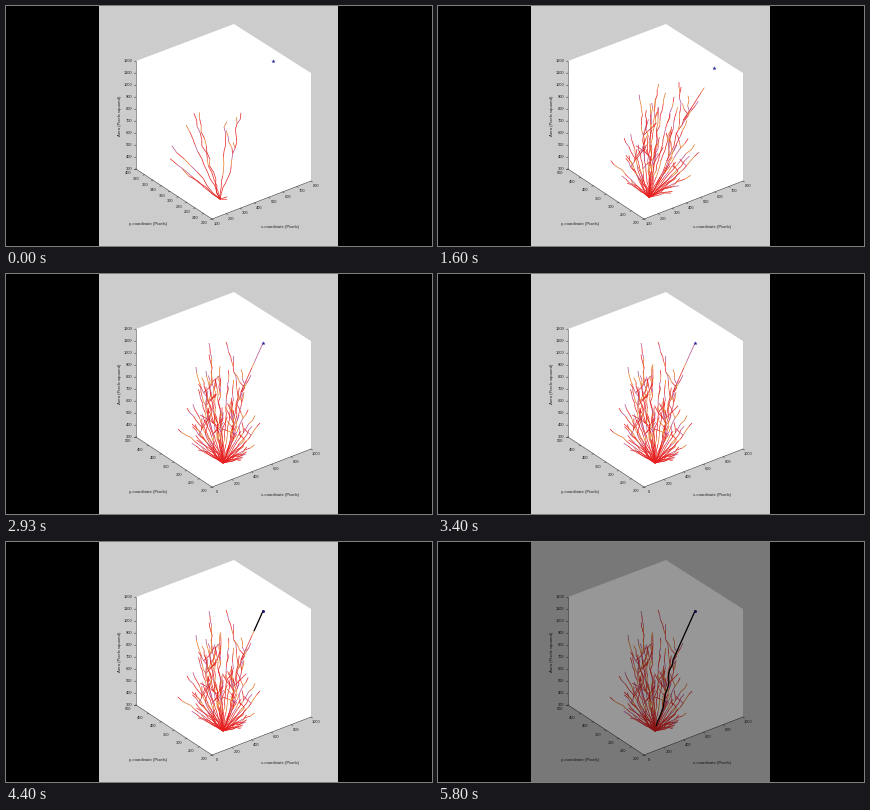
Animation, 426 px wide and 240 px high, one loop 5870 ms. Source, as a matplotlib script:

```python
import numpy as np
import matplotlib.pyplot as plt
from matplotlib.animation import FuncAnimation
from matplotlib.collections import LineCollection
from matplotlib.patches import Polygon, Rectangle

W, H, FRAMES, LOOP = 426, 240, 88, 5870
PX = 0.72  # points per pixel at 100 dpi
rng = np.random.default_rng(5)

# Projected cube: origin corner and its three edges on the stage
ORIGIN = np.array([206.0, 213.0])
EDGES = EX, EY, EZ = np.array([[99.0, -38.0], [-76.0, -50.0], [0.0, -108.0]])
Z_LIM = (300, 1200, 100)

# (first step, x limits, y limits): the axes rescale as the tree spreads
STAGES = [
    (0, (100, 800, 100), (220, 400, 20)),
    (6, (100, 800, 100), (200, 450, 50)),
    (17, (100, 800, 100), (200, 500, 50)),
    (36, (0, 1000, 200), (200, 500, 50)),
]

# Key spots, as they appear under the last axes
ROOT, ELBOW, FORK, GOAL = (217, 189), (232, 127), (235, 118), (257, 69)
STEM_TIPS = [(203, 69), (190, 93), (172, 155), (214, 92), (254, 149),
             (181, 134), (200, 97), (186, 150), (240, 180)]


def stage_at(i):
    return max(k for k, s in enumerate(STAGES) if i >= s[0])


def unit(v, lim):
    return (np.asarray(v, float) - lim[0]) / (lim[1] - lim[0])


def project(p, stage):
    lims = (*STAGES[stage][1:], Z_LIM)
    uvw = np.column_stack([unit(p[:, k], lim) for k, lim in enumerate(lims)])
    return ORIGIN + uvw @ EDGES


def lift(sx, sy):
    """Point in space seen at (sx, sy); depth grows with height above the root."""
    x = 195 + 4.7 * (ROOT[1] - sy) + 3 * max(0, sx - ROOT[0])
    x = np.clip(x, max(105, (sx - 206) / 0.099 + 8), min(785, (sx - 131) / 0.099))
    u = x / 1000
    v = (206 + 99 * u - sx) / 76
    w = (213 - 38 * u - 50 * v - sy) / 108
    return x, 200 + 300 * v, 300 + 900 * w


def front(sy):
    """Step at which the growing front reaches height sy."""
    return -6 + 44 * max(0, (ROOT[1] - sy) / 120) ** 3.6


flat, pos, parent, birth = [], [], [], []


def add(prev, sx, sy, born):
    p = lift(sx, sy)
    if prev >= 0:
        born = max(born, birth[prev])
    # Nothing leaves the box before the axes have made room for it
    if not 220 <= p[1] <= 400:
        born = max(born, STAGES[1][0])
    if p[1] > 450:
        born = max(born, STAGES[2][0])
    for items, item in zip((flat, pos, parent, birth), ((sx, sy), p, prev, born)):
        items.append(item)
    return len(flat) - 1


def grow(start, tip, bow=0, delay=0, jitter=0.6):
    """Chain of short edges from the node nearest to start, bent sideways by bow."""
    node = int(np.argmin(np.hypot(*(np.array(flat) - start).T)))
    a, d = np.array(flat[node]), np.subtract(tip, flat[node])
    size = np.hypot(*d)
    side = np.array([-d[1], d[0]]) / size
    n = max(2, round(size / 5))
    for f in np.arange(1, n + 1) / n:
        shake = jitter * rng.normal() * (f < 1)
        sx, sy = a + d * f + side * (bow * np.sin(np.pi * f) + shake)
        node = add(node, sx, sy, front(sy) + delay)
    return node


add(-1, *ROOT, -40)
grow(ROOT, ELBOW, 2, -4)
grow(ELBOW, FORK, 0, -4)
fork = grow(FORK, FORK + 0.6 * np.subtract(GOAL, FORK), 0, 6, 0)
goal = add(fork, *GOAL, 38)
grow(ELBOW, (220, 68), 2.5)
grow(FORK, (245, 101), 1, 10)
for k, tip in enumerate(STEM_TIPS):
    grow(ROOT, tip, rng.uniform(-3, 3), 2.5 * k)

# Fan of stems, longest when upright
for ang in np.radians(np.linspace(8, 152, 34)):
    reach = 24 + 30 * np.sin(ang) + 45 * np.sin(ang) ** 8
    r = reach * rng.uniform(0.5, 1)
    tip = ROOT + r * np.array([np.cos(ang), -np.sin(ang)])
    grow(ROOT, tip, rng.uniform(-2, 2), rng.uniform(0, 38))

# Side twigs, mostly upright and kept inside the crown
for _ in range(130):
    k = int(rng.integers(1, len(flat)))
    sx, sy = flat[k]
    ang = np.pi / 2 + rng.normal(0, 0.5)
    r = rng.uniform(7, 19)
    tip = sx + r * np.cos(ang), sy - r * np.sin(ang)
    if sy < 168 and tip[1] > 76 and 189 < tip[0] < 243 and k != goal:
        grow((sx, sy), tip, 0, max(birth[k] - front(sy), 0) + rng.uniform(1, 18))

PARENT, BIRTH = np.array(parent), np.minimum(birth, 46)
VIEWS = [project(np.array(pos), s) for s in range(len(STAGES))]

# Red at the base; red, orange and violet edges mixed further out
TINTS = np.array([(0.90, 0.12, 0.12), (0.90, 0.45, 0.15), (0.72, 0.30, 0.55)])
mix = rng.choice(3, len(flat), p=[0.5, 0.28, 0.22])
near = np.hypot(*(np.array(flat) - ROOT).T) < 22
COLORS = TINTS[np.where(near, 0, mix)]

# Way back from the goal to the root
chain = [goal]
while PARENT[chain[-1]] >= 0:
    chain.append(PARENT[chain[-1]])
WAY = VIEWS[-1][chain]
WAY_S = np.r_[0, np.cumsum(np.hypot(*np.diff(WAY, axis=0).T))]
FORK_S = np.hypot(*np.subtract(GOAL, FORK))

fig = plt.figure(figsize=(W / 100, H / 100), dpi=100, facecolor="black")
ax = fig.add_axes([0, 0, 1, 1])
ax.set_xlim(0, W)
ax.set_ylim(H, 0)
ax.axis("off")

ax.add_patch(Rectangle((93, 0), 239, H, fc="#cccccc", lw=0))
hull = [ORIGIN, ORIGIN + EX, ORIGIN + EX + EZ, (228, 18), ORIGIN + EY + EZ, ORIGIN + EY]
ax.add_patch(Polygon(hull, fc="white", lw=0))


def stroke(a, b):
    return ax.plot(*zip(a, b), color="#333333", lw=0.5 * PX)[0]


def label(x, y, s, size=4.0, ha="center", **kw):
    return ax.text(x, y, s, fontsize=size * PX, family="Liberation Sans",
                   color="#222222", ha=ha, va="center", **kw)


def ticks(lim, base, edge, mark, shift, ha="center"):
    out = []
    for v in range(lim[0], lim[1] + 1, lim[2]):
        p = base + edge * unit(v, lim)
        out += [stroke(p, p + mark), label(*(p + shift), str(v), ha=ha)]
    return out


for a, edge in [(ORIGIN, EX), (ORIGIN, EY), (ORIGIN + EY, EZ)]:
    stroke(a, a + edge)
ticks(Z_LIM, ORIGIN + EY, EZ, (-1.5, 0.8), (-3.5, 0), "right")
label(114, 110, "Area (Pixels squared)", 4.3, rotation=90)
label(274, 221, "x-coordinate (Pixels)", 4.3)
label(142, 218, "y-coordinate (Pixels)", 4.3)
tick_sets = [
    ticks(xl, ORIGIN, EX, (1.4, 1.0), (5, 5)) + ticks(yl, ORIGIN, EY, (-1.5, 0.7), (-8, 4.5))
    for _, xl, yl in STAGES
]

edges = LineCollection([], linewidths=0.7 * PX)
ax.add_collection(edges)
way, = ax.plot([], [], color="black", lw=1.2 * PX)
star, = ax.plot([], [], "*", color="#2b2b9a", ms=4.5 * PX, mew=0)
ball, = ax.plot([], [], "o", color="#1c1c70", ms=3 * PX, mew=0)
veil = ax.add_patch(Rectangle((0, 0), W, H, fc="black", lw=0, alpha=0, zorder=10))


def draw(i):
    s = stage_at(i)
    for k, group in enumerate(tick_sets):
        for art in group:
            art.set_visible(k == s)

    pts = VIEWS[s]
    alive = np.flatnonzero((BIRTH <= i) & (PARENT >= 0))
    edges.set_segments(np.stack([pts[PARENT[alive]], pts[alive]], axis=1))
    edges.set_color(COLORS[alive])

    for mark, on in ((star, i < 57), (ball, i >= 57)):
        mark.set_data(*pts[[goal]].T)
        mark.set_visible(on)

    reach = np.interp(i, [59, 74, 87], [0, FORK_S, WAY_S[-1]])
    d = np.r_[WAY_S[WAY_S < reach], reach]
    way.set_data(np.interp(d, WAY_S, WAY[:, 0]), np.interp(d, WAY_S, WAY[:, 1]))
    veil.set_alpha(0.44 * np.clip((i - 80) / 6.5, 0, 1))
    return edges, way, star, ball, veil


anim = FuncAnimation(fig, draw, frames=FRAMES, interval=LOOP / FRAMES, repeat=True, repeat_delay=0, blit=False)
plt.show()
```
